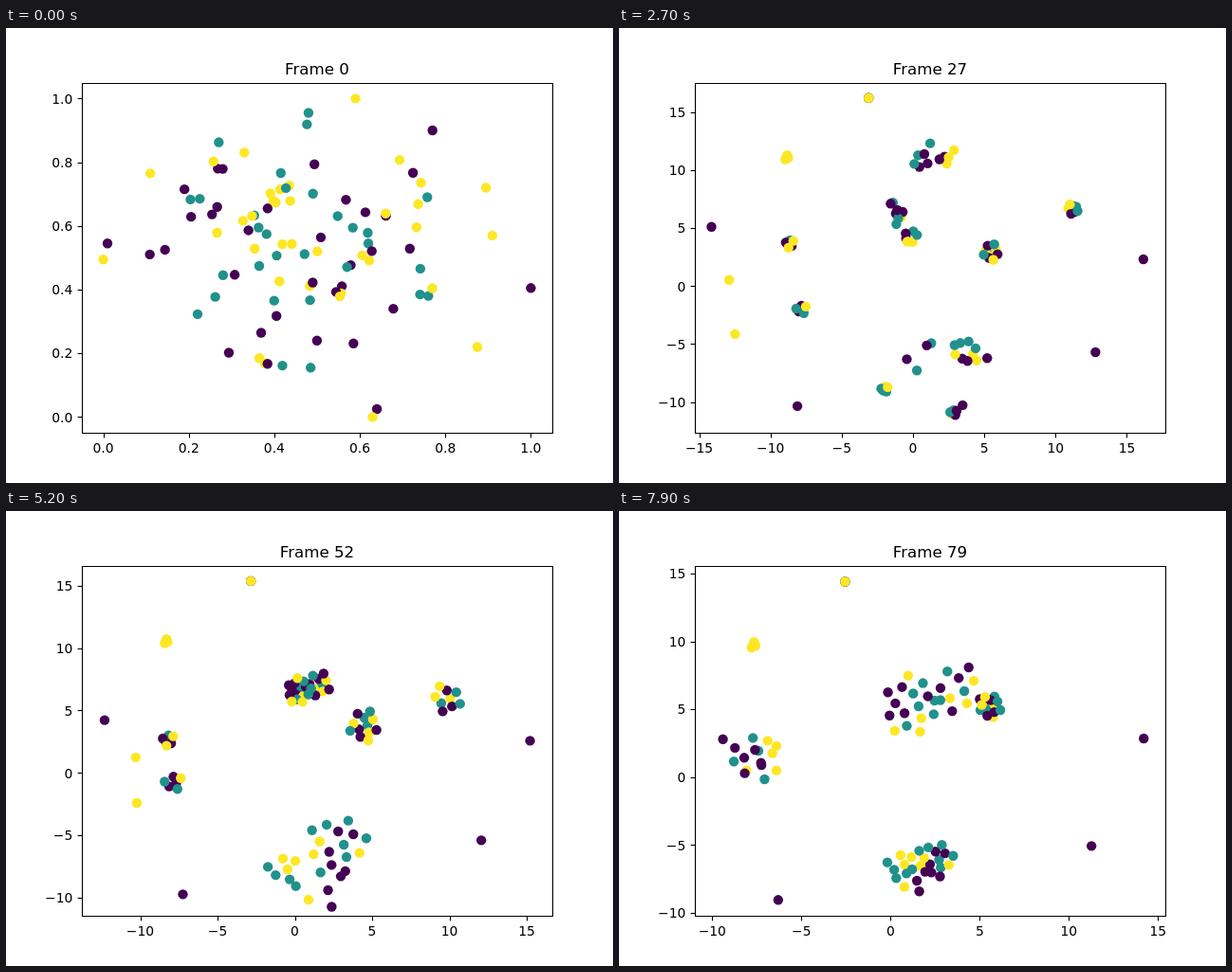
Write an HTML page that moves like this. It is 640 px wide and 480 px high and loops after 8000 ms.

```html
<!DOCTYPE html>
<html lang="en">
<head>
<meta charset="utf-8">
<title>Scatter animation</title>
<style>
  html, body { margin: 0; width: 100%; height: 100%; overflow: hidden; background: #fff; }
  svg { display: block; width: 640px; height: 480px; }
  text { font: 13.89px "DejaVu Sans", sans-serif; fill: #000; }
  #title { font-size: 16.67px; text-anchor: middle; }
  .x { text-anchor: middle; }
  .y { text-anchor: end; }
  path { fill: none; stroke: #000; stroke-width: 1.11; }
</style>
</head>
<body>
<svg viewBox="0 0 640 480">
  <g id="dots"></g>
  <g id="ticks"></g>
  <path d="M80.5 58.5H576.5V427.5H80.5Z"/>
  <text id="title" x="328" y="49"></text>
</svg>
<script>
const STEP = 100, COUNT = 80, FIRST = 10, LAST = 79;
const COLORS = { P: '#440154', T: '#21918c', Y: '#fde725' };
const BOX = { left: 80, right: 576, top: 57.6, bottom: 427.2 };
const byId = id => document.getElementById(id);

// Piecewise linear; the first segment also reaches back before its key
function sample(times, values, n) {
  let k = 0;
  while (k < times.length - 2 && n >= times[k + 1]) k++;
  const u = (n - times[k]) / (times[k + 1] - times[k]);
  return values[k].map((v, d) => v + u * (values[k + 1][d] - v));
}

// Views: origin x, y and pixels per unit x, y
const UNIT_VIEW = [102.5, 410.4, 450.9, 336];
const VIEWS = [
  [312.8, 264.4, 14.33, 11.28], [307.5, 279.4, 15.65, 13.06], [304.5, 276.3, 16.3, 13.17],
  [293.6, 280, 17.75, 13.88], [286.3, 280.8, 18.8, 14.31]
];
const viewAt = n => n ? sample([FIRST, 42, 52, 68, LAST], VIEWS, n) : UNIT_VIEW;
const toStage = ([ox, oy, sx, sy], x, y) => [ox + x * sx, oy - y * sy];

// Lone dots drift in data units; power > 1 speeds up on the way
const loners = [
  { kinds: 'TPY', from: [-3.3, 16.84], to: [-2.55, 14.42], power: 1 },
  { kinds: 'P', from: [16.8, 2.15], to: [14.2, 2.85], power: 1 },
  { kinds: 'P', from: [13.3, -5.9], to: [11.27, -5.07], power: 1 },
  { kinds: 'P', from: [-8.7, -10.77], to: [-6.3, -9.05], power: 1 },
  { kinds: 'P', from: [-14.7, 5.4], to: [-9.4, 2.8], power: 1.6 },
  { kinds: 'Y', from: [-13.8, 0.3], to: [-6.4, 2.3], power: 1.5 },
  { kinds: 'Y', from: [-13.1, -4.6], to: [-6.4, 0.5], power: 1.7 }
];

// Small groups meet in a hub at frame `join`; hub path is x, y, radius on stage
const hubs = [
  { join: 27, path: [[177, 137, 3], [169, 138, 3], [153, 141, 3], [142, 142, 4]],
    groups: [[167, 138, 'YY'], [204, 126, 'Y']] },
  { join: 27, path: [[180, 227, 5], [171, 241, 7], [150, 256, 10], [140, 253, 22]],
    groups: [[189, 228, 'TPTP'], [175, 194, 'PY'], [171, 237, 'Y']] },
  { join: 27, path: [[192, 297, 6], [176, 287, 10], [150, 272, 16], [142, 268, 24]],
    groups: [[194, 297, 'P'], [224, 293, 'P'], [168, 285, 'PTTY']] },
  { join: 42, path: [[326, 146, 12], [329, 184, 14], [337, 203, 13], [357, 190, 28]],
    groups: [[327, 94, 'T'], [388, 106, 'Y'], [362, 132, 'PYPY'], [310, 134, 'PTPTP']] },
  { join: 42, path: [[305, 209, 9], [309, 190, 14], [330, 205, 13], [309, 206, 33]],
    groups: [[268, 156, 'TP'], [285, 182, 'TYPPTP'], [271, 202, 'T'], [311, 232, 'PTYPTY'], [307, 254, 'Y']] },
  { join: 27, path: [[392, 236, 9], [377, 226, 17], [340, 208, 12], [391, 206, 12]],
    groups: [[402, 183, 'T'], [401, 220, 'P'], [395, 210, 'TYYY'], [394, 260, 'PPPTT'], [458, 249, 'Y']] },
  { join: 27, path: [[478, 191, 6], [464, 198, 16], [441, 202, 14], [391, 206, 12]],
    groups: [[468, 171, 'Y'], [485, 188, 'TPPYTPYT']] },
  { join: 42, path: [[350, 355, 18], [349, 352, 32], [325, 371, 20], [333, 368, 20]],
    groups: [[301, 307, 'TP'], [250, 352, 'P'], [267, 360, 'T'], [420, 348, 'YP'], [380, 324, 'PTYYTPTT']] },
  { join: 27, path: [[280, 381, 4], [291, 378, 17], [312, 374, 12], [296, 373, 15]],
    groups: [[286, 356, 'YTY'], [272, 402, 'TTY']] },
  { join: 42, path: [[348, 404, 4], [330, 400, 28], [328, 384, 18], [308, 390, 18]],
    groups: [[377, 391, 'P'], [358, 408, 'YTPTP']] }
];

// Rim of the opening cloud; the rest is seeded
const rim = [
  [0, 0.495, 'Y'], [0.01, 0.545, 'P'], [0.11, 0.765, 'Y'], [0.19, 0.715, 'P'], [0.59, 1, 'Y'],
  [0.48, 0.955, 'T'], [0.77, 0.9, 'P'], [0.895, 0.72, 'Y'], [0.91, 0.57, 'Y'], [1, 0.405, 'P'],
  [0.875, 0.22, 'Y'], [0.64, 0.025, 'P'], [0.63, 0, 'Y'], [0.485, 0.155, 'T'], [0.365, 0.185, 'Y']
];

function randomFrom(seed) {
  return () => (seed = (seed * 16807) % 2147483647) / 2147483647;
}

function dot([x, y], kind) {
  return `<circle cx="${x.toFixed(2)}" cy="${y.toFixed(2)}" r="5.2" fill="${COLORS[kind]}"/>`;
}

function openingDots(view) {
  const random = randomFrom(4711);
  let out = rim.map(([x, y, kind]) => dot(toStage(view, x, y), kind)).join('');
  for (let i = 0; i < 85; i++) {
    const r = Math.min(1.9, Math.sqrt(-2 * Math.log(random()))), a = random() * 2 * Math.PI;
    out += dot(toStage(view, 0.45 + 0.18 * r * Math.cos(a), 0.54 + 0.2 * r * Math.sin(a)), 'PTY'[i % 3]);
  }
  return out;
}

function lonerDots(view, n) {
  return loners.map(({ kinds, from, to, power }) => {
    const u = Math.max(0, (n - FIRST) / (LAST - FIRST)) ** power;
    const [x, y] = from.map((v, d) => v + u * (to[d] - v));
    return [...kinds].map(kind => dot(toStage(view, x, y), kind)).join('');
  }).join('');
}

// Members sit on a golden-angle spiral that grows with the hub radius
function hubDots({ join, path, groups }, n) {
  const total = groups.reduce((sum, g) => sum + g[2].length, 0);
  let i = 0, out = '';
  for (const [x0, y0, kinds] of groups) {
    const start = [x0, y0, Math.min(6, kinds.length - 1)];
    const [x, y, r] = sample([FIRST, join, 52, 68, LAST], [start, ...path], n);
    for (const kind of kinds) {
      const a = i * 2.4, d = r * Math.sqrt((i++ + 0.7) / total);
      out += dot([x + d * Math.cos(a), y + d * Math.sin(a)], kind);
    }
  }
  return out;
}

function ticks([ox, oy, sx, sy], step, digits) {
  const label = k => (k * step).toFixed(digits).replace('-', '\u2212');
  const dx = sx * step, dy = sy * step;
  let out = '';
  for (let k = Math.ceil((BOX.left - ox) / dx); ox + k * dx <= BOX.right; k++) {
    const x = ox + k * dx;
    out += `<path d="M${Math.round(x) + 0.5} 427.5v4.9"/><text class="x" x="${x}" y="448">${label(k)}</text>`;
  }
  for (let k = Math.ceil((oy - BOX.bottom) / dy); oy - k * dy >= BOX.top; k++) {
    const y = oy - k * dy;
    out += `<path d="M80.5 ${Math.round(y) + 0.5}h-4.9"/>`
      + `<text class="y" x="70.3" y="${Math.round(y + 5.2)}">${label(k)}</text>`;
  }
  return out;
}

function render(n) {
  const view = viewAt(n);
  byId('title').textContent = 'Frame ' + n;
  byId('dots').innerHTML = n
    ? lonerDots(view, n) + hubs.map(hub => hubDots(hub, n)).join('')
    : openingDots(view);
  byId('ticks').innerHTML = n ? ticks(view, 5, 0) : ticks(view, 0.2, 1);
}

let shown = -1;
const start = performance.now();
function tick() {
  const n = Math.floor((performance.now() - start) / STEP) % COUNT;
  if (n !== shown) render(shown = n);
  requestAnimationFrame(tick);
}
tick();
</script>
</body>
</html>
```
